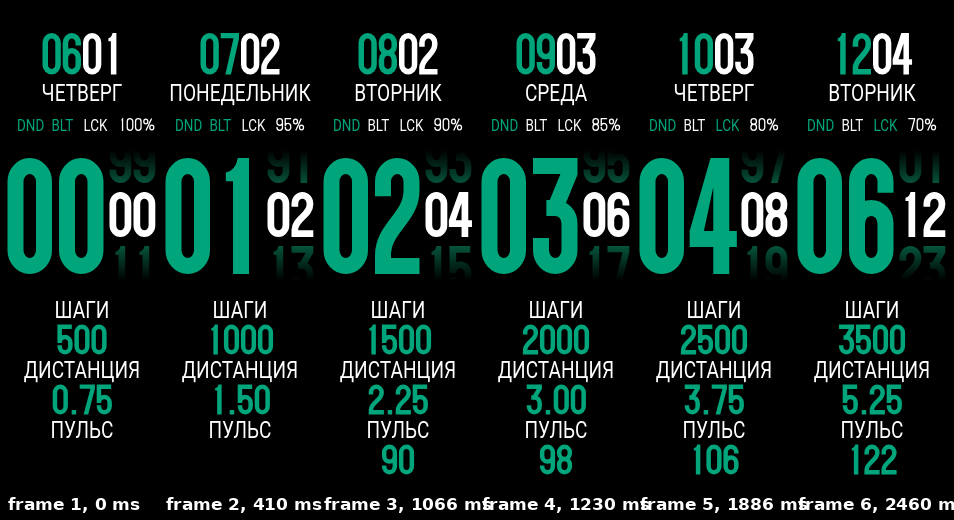
Write an HTML page that moves like this. It is 152 px wide and 486 px high and loops after 2870 ms.

```html
<!DOCTYPE html>
<html lang="ru">
<head>
<meta charset="utf-8">
<title>Watch face</title>
<style>
  html, body { margin: 0; width: 100%; height: 100%; overflow: hidden; background: #000; }
  svg { display: block; }
  text { font-family: Roboto, "Noto Sans", sans-serif; font-weight: 400; font-size: 23px; fill: #fff; }
  .mid { text-anchor: middle; }
  .small { font-size: 16.2px; }
</style>
</head>
<body>
<svg id="face" width="152" height="486" viewBox="0 0 152 486">
  <defs>
    <linearGradient id="fadeIn" gradientUnits="userSpaceOnUse" x1="0" y1="144" x2="0" y2="180">
      <stop offset="0" stop-color="#000"/><stop offset="1" stop-color="#06593f"/>
    </linearGradient>
    <linearGradient id="fadeOut" gradientUnits="userSpaceOnUse" x1="0" y1="238" x2="0" y2="275">
      <stop offset="0" stop-color="#06593f"/><stop offset="1" stop-color="#000"/>
    </linearGradient>
  </defs>
</svg>
<script>
const GREEN = '#00a57b', WHITE = '#fff', STEP = 410, COUNT = 7;
const DAYS = ['ЧЕТВЕРГ', 'ПОНЕДЕЛЬНИК', 'ВТОРНИК', 'СРЕДА'];
const face = document.getElementById('face');

function add(parent, tag, attrs) {
  const el = document.createElementNS('http://www.w3.org/2000/svg', tag);
  for (const k in attrs) el.setAttribute(k, attrs[k]);
  return parent.appendChild(el);
}

// Condensed digit in a w × h box at (x, y); returns [stroked path, filled path].
function glyph(ch, x, y, w, h, s) {
  const a = s / 2, l = x + a, r = x + w - a, t = y + a, b = y + h - a;
  const k = (r - l) / 2, X = f => x + f * w, Y = f => y + f * h;
  const q = Math.min(k * 1.1, (Y(.48) - t) / 2);
  const cw = (px, py) => `A${k} ${q} 0 0 1 ${px} ${py}`;
  const ccw = (px, py) => `A${k} ${q} 0 0 0 ${px} ${py}`;
  const ring = (top, bot) =>
    `M${l} ${top + q}${cw(r, top + q)}V${bot - q}${cw(l, bot - q)}Z`;
  const edge = X(.72), stem = X(.86), bar = Y(.63);
  switch (ch) {
    case '0': return [ring(t, b), ''];
    case '1': return ['', `M${edge} ${y}V${y + h}H${edge - s}V${Y(.2)}H${edge - 1.45 * s}V${Y(.125)}` +
      `Q${edge - .85 * s} ${Y(.11)} ${edge - .7 * s} ${y}Z`];
    case '2': return [`M${l} ${Y(.33)}V${t + q}${cw(r, t + q)}V${Y(.28)}` +
      `C${r} ${Y(.52)} ${l} ${Y(.6)} ${l} ${Y(.84)}V${b}H${x + w}`, ''];
    case '3': return [`M${x} ${t}H${r}V${Y(.13)}L${X(.5)} ${Y(.43)}` +
      `M${X(.3)} ${Y(.43)}H${X(.5)}${cw(r, Y(.43) + q)}V${b - q}${cw(l, b - q)}V${Y(.69)}`, ''];
    case '4': return ['', `M${X(.44)} ${y}H${stem}V${bar}H${X(1.03)}V${bar + s}H${stem}V${y + h}H${stem - s}V${bar + s}` +
      `H${X(-.03)}V${bar}ZM${stem - s} ${Y(.25)}V${bar}H${X(.29)}Z`];
    case '5': return [`M${X(.95)} ${t}H${l}V${Y(.42) + q}${cw(r, Y(.42) + q)}V${b - q}${cw(l, b - q)}V${Y(.69)}`, ''];
    case '6': return [`M${r} ${Y(.3)}V${t + q}${ccw(l, t + q)}V${b - q}${ccw(r, b - q)}V${Y(.43) + q}${ccw(l, Y(.43) + q)}`, ''];
    case '7': return ['', `M${x} ${y}H${x + w}V${Y(.14)}L${X(.56)} ${y + h}H${X(.56) - s * 1.02}L${x + w - s} ${y + s * .95}H${x}Z`];
    case '8': return [ring(t, Y(.48)) + ring(Y(.48), b), ''];
    case '9': return [`M${l} ${Y(.7)}V${b - q}${ccw(r, b - q)}V${t + q}${ccw(l, t + q)}V${Y(.57) - q}${ccw(r, Y(.57) - q)}`, ''];
    case '.': return ['', `M${x + 2} ${y + h}v${-s}h${s}v${s}Z`];
    case '%': {
      const dot = (cx, cy) => `M${cx - 2} ${cy}a2 2.4 0 0 1 4 0a2 2.4 0 0 1 -4 0Z`;
      return [dot(x + 2.6, Y(.27)) + dot(x + 8.6, Y(.73)) + `M${x + 8.4} ${Y(.04)}L${x + 2.8} ${Y(.96)}`, ''];
    }
  }
}

// A row of tabular digits; anchor .5 centres it on x.
function digits(x, y, w, h, s, gap, color, anchor = 0) {
  const g = add(face, 'g', { role: 'img' });
  const line = add(g, 'path', { fill: 'none', stroke: color, 'stroke-width': s });
  const solid = add(g, 'path', { fill: color, 'fill-rule': 'evenodd' });
  const advance = ch => ch === '.' ? s + 5.5 : w + gap;
  return value => {
    const str = String(value);
    const total = [...str].reduce((sum, ch) => sum + advance(ch), -gap);
    let pen = x - total * anchor, strokes = '', fills = '';
    for (const ch of str) {
      const [d, f] = glyph(ch, pen, y, w, h, s);
      strokes += d;
      fills += f;
      pen += advance(ch);
    }
    line.setAttribute('d', strokes);
    solid.setAttribute('d', fills);
    g.setAttribute('aria-label', str);
  };
}

function label(str, x, y, cls) {
  const el = add(face, 'text', { class: cls, transform: `translate(${x} ${y}) scale(.83 1)` });
  el.textContent = str;
  return el;
}

const two = n => String(n).padStart(2, '0');
const shift = (str, n) => [...str].map(c => (+c + n + 10) % 10).join('');

const day = digits(36.5, 27, 18.3, 41.5, 5.5, 1.9, GREEN);
const month = digits(77, 27, 18.3, 41.5, 5.5, 1.9, WHITE);
const weekday = label('', 76, 95, 'mid');
const dnd = label('DND', 11, 124.5, 'small');
const blt = label('BLT', 45.5, 124.5, 'small');
const lck = label('LCK', 77.5, 124.5, 'small');
const battery = digits(112.3, 112, 6.8, 13, 1.3, 1.5, WHITE);
const hours = digits(1.5, 152, 44.5, 116, 16, 7, GREEN);
const above = digits(103.5, 132, 21.8, 45, 6.7, 2.2, 'url(#fadeIn)');
const minutes = digits(103.5, 186, 21.8, 45, 6.7, 2.2, WHITE);
const below = digits(103.5, 240, 21.8, 45, 6.7, 2.2, 'url(#fadeOut)');
label('ШАГИ', 76, 312, 'mid');
const steps = digits(76, 318.5, 15.2, 30, 4.5, 1.8, GREEN, .5);
label('ДИСТАНЦИЯ', 76, 372, 'mid');
const distance = digits(76.3, 378.5, 15.2, 30, 4.5, 1.8, GREEN, .5);
label('ПУЛЬС', 76, 432, 'mid');
const pulse = digits(76, 438.5, 15.2, 30, 4.5, 1.8, GREEN, .5);

function draw(i) {
  const min = two(2 * i);
  const light = (el, on) => { el.style.fill = on ? GREEN : WHITE; };
  day(two(6 + i));
  month(two(1 + Math.ceil(i / 2)));
  weekday.textContent = DAYS[i % DAYS.length];
  light(dnd, true);
  light(blt, i < 2);
  light(lck, i > 3);
  battery(100 - 5 * i + '%');
  hours(two(i));
  above(shift(min, -1));
  minutes(min);
  below(shift(min, 1));
  steps(500 * (i + 1));
  distance((.75 * (i + 1)).toFixed(2));
  pulse(i < 2 ? '' : 74 + 8 * i);
}

let shown = -1;
const start = performance.now();
function tick() {
  const i = Math.floor((performance.now() - start) / STEP) % COUNT;
  if (i !== shown) draw(shown = i);
  requestAnimationFrame(tick);
}
tick();
</script>
</body>
</html>
```
